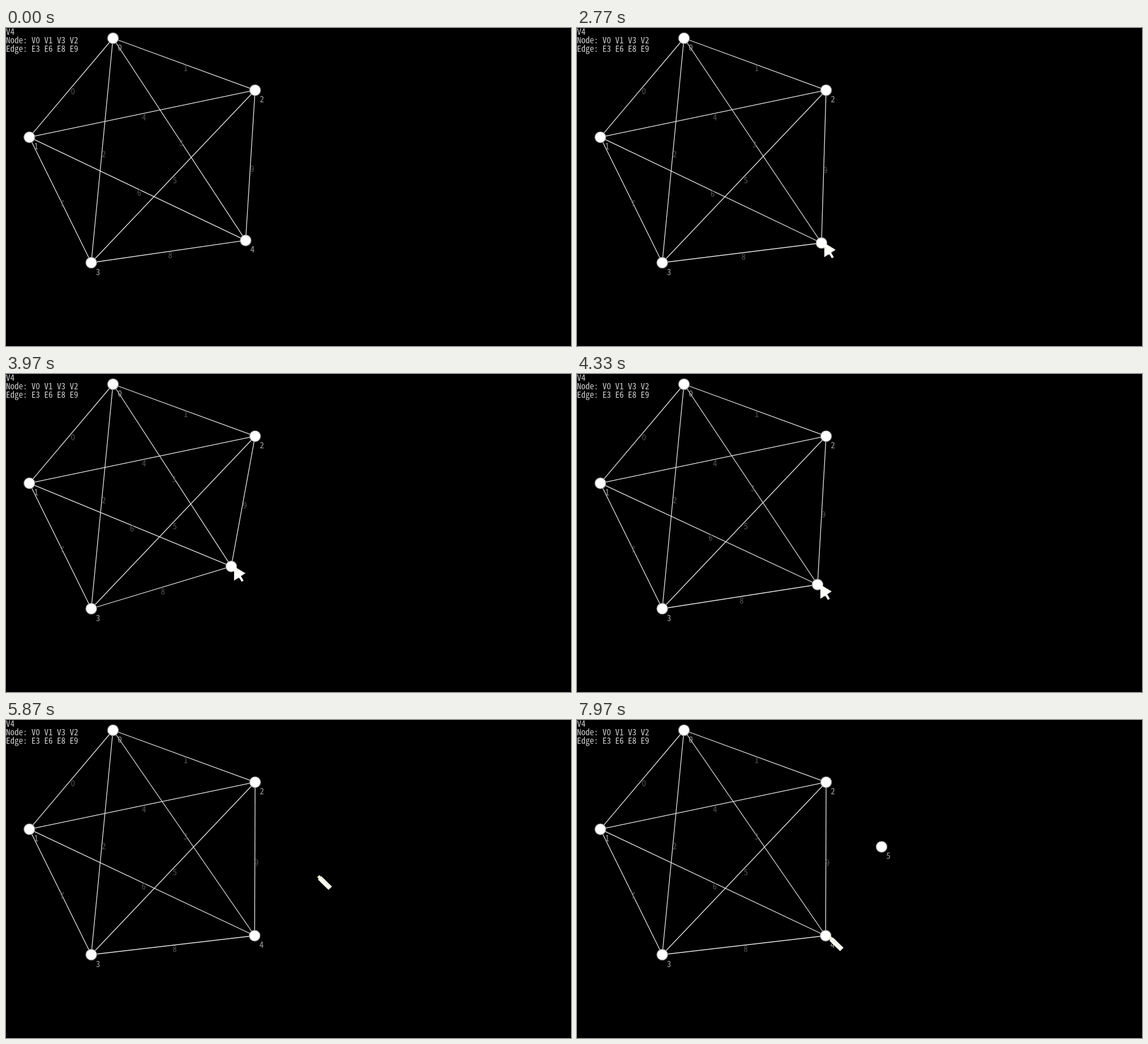
Animation, 998 px wide and 561 px high, one loop 8 s. Source, as an HTML page with a canvas:

```html
<!DOCTYPE html>
<html lang="en">
<head>
<meta charset="utf-8">
<title>Graph editor</title>
<style>
html, body { margin: 0; width: 100%; height: 100%; overflow: hidden; background: #000; }
canvas { display: block; }
</style>
</head>
<body>
<canvas id="stage" width="998" height="561"></canvas>
<script>
const ctx = document.getElementById('stage').getContext('2d');
const LOOP = 8000, ENTER = 1730, GRAB = 2570, DROP = 4700, PENCIL = 5870, ADD = 7050;

const nodes = [[189, 18], [41.3, 192.7], [440, 109.7], [150.6, 414], [423.3, 374.7]];
const info = ['V4', 'Node: V0 V1 V3 V2', 'Edge: E3 E6 E8 E9'];

// Every pair of nodes is joined; the digits name the edges in pair order
const edgeNames = [...'0123476598'];
const edges = nodes.flatMap((_, a) => nodes.slice(a + 1).map((_, i) => [a, a + 1 + i]));

// Pointer moves: start time, end time, and where the tip comes to rest
const entry = [402, 561];
const moves = [
  [ENTER, 2400, 428.3, 374.7],
  [GRAB, 3270, 471, 397.5],
  [3400, 4050, 400, 337],
  [4050, 4510, 445, 389],
  [4510, 4680, 444.2, 380.5],
  [4740, 5040, 583, 268],
  [5040, 5330, 550, 274],
  [6140, 6240, 594, 305],
  [6350, 7100, 541, 226],
  [7310, 7970, 445, 382]
];

const CJK = '15px "Noto Sans Mono CJK JP", "Noto Sans Mono", monospace';
ctx.font = CJK;
const font = ctx.measureText('0').width < 7.8 ? CJK : '12.5px "Noto Sans Mono", monospace';

function ease(t, from, to) {
  const u = Math.min(1, Math.max(0, (t - from) / (to - from)));
  return u * u * (3 - 2 * u);
}

function pointer(t) {
  let [x, y] = entry;
  for (const [from, to, tx, ty] of moves) {
    const u = ease(t, from, to);
    x += (tx - x) * u;
    y += (ty - y) * u;
  }
  return [x, y];
}

function text(s, x, y, color, align = 'center') {
  ctx.fillStyle = color;
  ctx.textAlign = align;
  ctx.fillText(s, x, y);
}

function line(x1, y1, x2, y2, color, width) {
  ctx.beginPath();
  ctx.moveTo(x1, y1);
  ctx.lineTo(x2, y2);
  ctx.strokeStyle = color;
  ctx.lineWidth = width;
  ctx.stroke();
}

function drawEdge([x1, y1], [x2, y2], name) {
  line(x1, y1, x2, y2, '#e8e8e8', 1.3);
  text(name, (x1 + x2) / 2 + 3, (y1 + y2) / 2 + 12, '#505050');
}

function drawNode([x, y], i) {
  ctx.beginPath();
  ctx.arc(x, y, 9.7, 0, 2 * Math.PI);
  ctx.fillStyle = '#fff';
  ctx.fill();
  ctx.strokeStyle = '#888';
  ctx.lineWidth = 1.2;
  ctx.stroke();
  text(i, x + 12, y + 21.5, '#a0a0a0');
}

function drawArrow(x, y) {
  ctx.beginPath();
  ctx.moveTo(x, y);
  ctx.lineTo(x + 20, y + 12);
  ctx.lineTo(x, y + 25);
  ctx.fillStyle = '#fffffa';
  ctx.fill();
  line(x + 8, y + 14, x + 15, y + 26, '#fffffa', 4);
}

function drawPencil(x, y) {
  line(x + 4, y + 4.5, x + 22.7, y + 22.7, '#fffff4', 8.5);
  line(x + 1, y + 5, x + 5, y + 1, '#f0f0d8', 4);
  line(x + 7, y + 5, x + 20, y + 18, '#c8c8bc', 0.8);
}

function draw(t) {
  const [x, y] = pointer(t);
  const list = nodes.slice();
  if (t >= GRAB) {
    const [hx, hy] = pointer(Math.min(t, DROP));
    list[4] = [hx - 5, hy];
  }
  if (t >= ADD) list.push([538, 223.7]);

  ctx.fillStyle = '#000';
  ctx.fillRect(0, 0, 998, 561);
  ctx.font = font;
  edges.forEach(([a, b], i) => drawEdge(list[a], list[b], edgeNames[i]));
  list.forEach(drawNode);
  info.forEach((s, i) => text(s, 0, 12 + 15 * i, '#d0d0d0', 'left'));

  if (t >= PENCIL) drawPencil(x, y);
  else if (t >= ENTER) drawArrow(x, y);
}

const start = performance.now();
function tick() {
  draw((performance.now() - start) % LOOP);
  requestAnimationFrame(tick);
}
tick();
</script>
</body>
</html>
```
